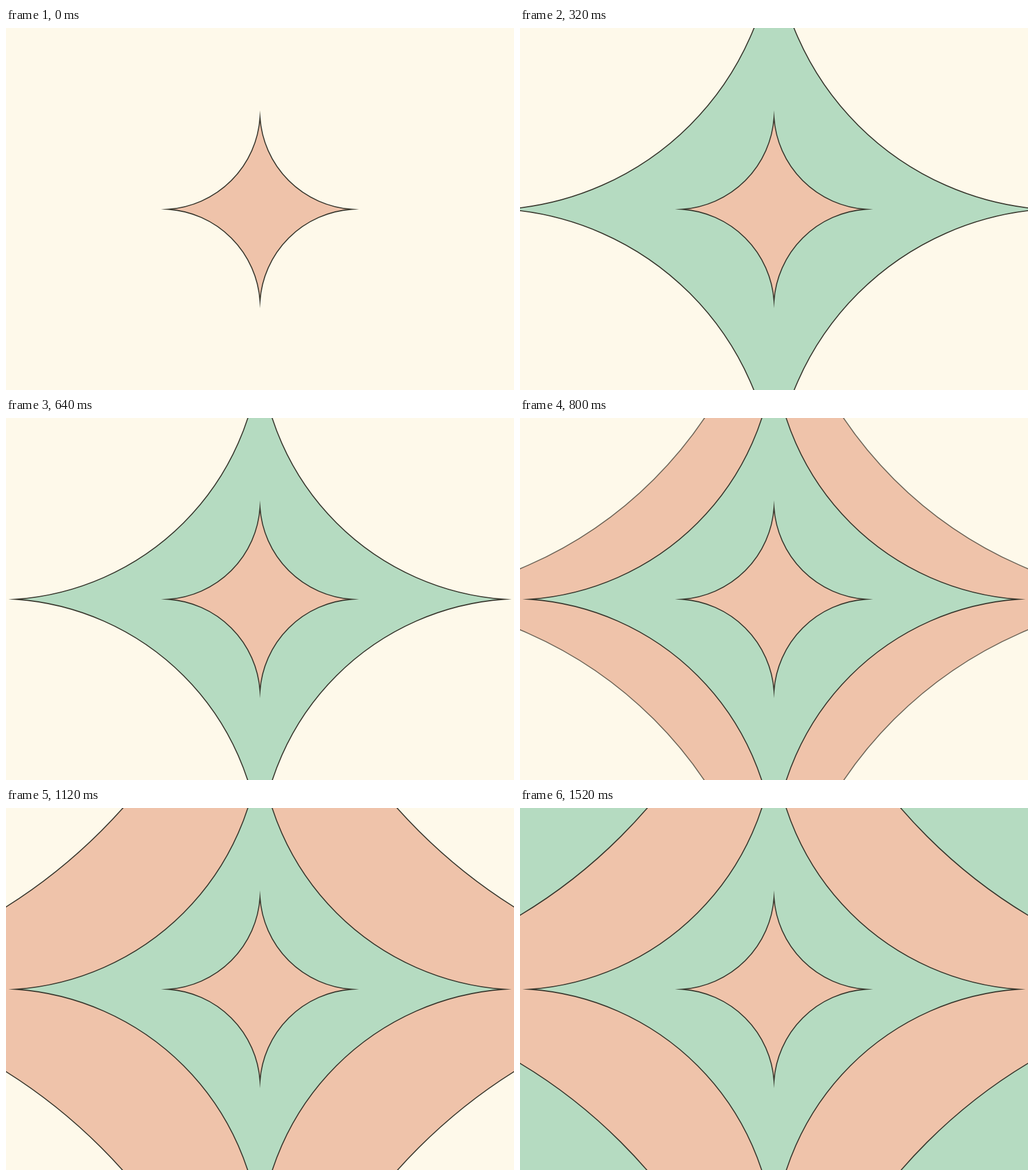
Animation of 886x632 px, one loop 2000 ms. Source, as an HTML page with a canvas:

```html
<!DOCTYPE html>
<html lang="en">
<head>
<meta charset="utf-8">
<title>Growing stars</title>
<style>
  html, body { margin: 0; width: 100%; height: 100%; overflow: hidden; background: #fef9ea; }
  canvas { display: block; }
</style>
</head>
<body>
<canvas width="886" height="632"></canvas>
<script>
const ctx = document.querySelector('canvas').getContext('2d');
const LOOP = 2000, STEP = 80, GROW = 538;
const PEACH = '#efc3aa', GREEN = '#b5dbc1';

// Back to front; size is the distance of the arc centres from the axes.
const stars = [
  { size: 1600, start: 1340, fill: GREEN },
  { size: 917, start: 674, fill: PEACH },
  { size: 458, start: 8, fill: GREEN },
  { size: 172, start: -LOOP, fill: PEACH },
];

const easeOutBack = x => 1 + 2.70158 * (x - 1) ** 3 + 1.70158 * (x - 1) ** 2;

// Four concave arcs meeting in sharp tips on the axes.
function starPath(size) {
  const tip = size * 0.93;
  const r = Math.hypot(size, size - tip);
  const arc = (x, y) => `A${r} ${r} 0 0 0 ${x} ${y}`;
  return new Path2D(`M${tip} 0` + arc(0, tip) + arc(-tip, 0) + arc(0, -tip) + arc(tip, 0) + 'Z');
}

function drawStar({ size, start, fill }, t) {
  const x = Math.min((t - start) / GROW, 1);
  if (x <= 0) return;
  const path = starPath(size * easeOutBack(x));
  ctx.fillStyle = fill;
  ctx.fill(path);
  ctx.globalAlpha = Math.min(1, 0.5 + 0.9 * x);
  ctx.stroke(path);
  ctx.globalAlpha = 1;
}

function draw(now) {
  const t = Math.floor((now % LOOP) / STEP) * STEP;
  ctx.setTransform(1, 0, 0, 1, 0, 0);
  ctx.fillStyle = '#fef9ea';
  ctx.fillRect(0, 0, 886, 632);
  ctx.translate(443, 316.5);
  ctx.strokeStyle = '#3a392f';
  ctx.lineWidth = 1.8;
  ctx.miterLimit = 30;
  for (const star of stars) drawStar(star, t);
}

const origin = performance.now();
(function tick() {
  draw(performance.now() - origin);
  requestAnimationFrame(tick);
})();
</script>
</body>
</html>
```
